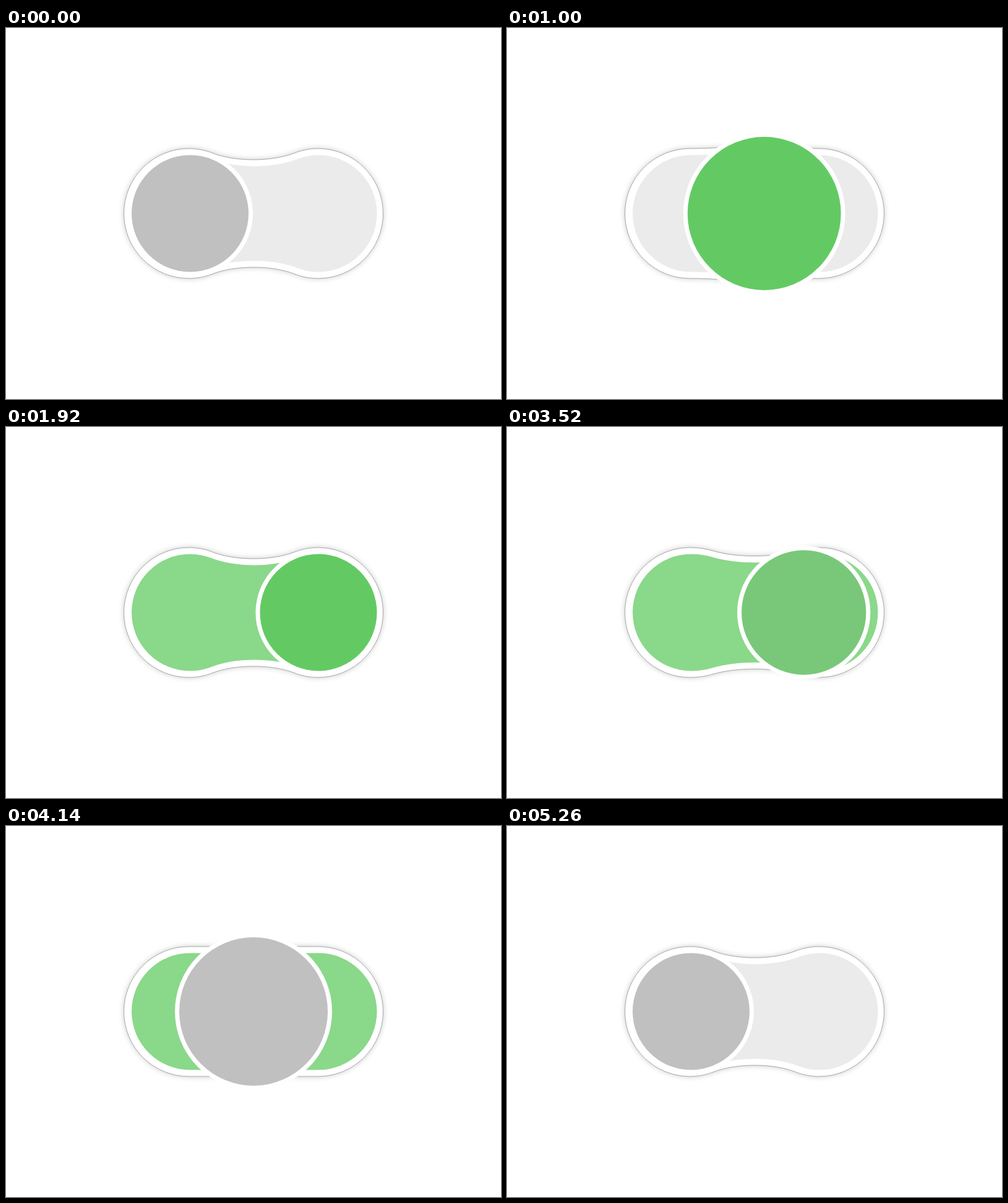
These frames come from a looping animation (800x600 px, 5580 ms). An HTML page:

```html
<!DOCTYPE html>
<html lang="en">
<head>
<meta charset="utf-8">
<title>Elastic toggle</title>
<style>
  html, body { margin: 0; width: 100%; height: 100%; overflow: hidden; background: #fff; }
  svg { display: block; width: 800px; height: 600px; }
  #body { fill: #fff; stroke: #a6a6a6; stroke-width: 1; filter: drop-shadow(0 0 4px rgba(0, 0, 0, .2)); }
  #knob { stroke: #fff; stroke-width: 14; paint-order: stroke; }
</style>
</head>
<body>
<svg viewBox="0 0 800 600">
  <path id="body"/>
  <path id="track"/>
  <circle id="knob" cy="300"/>
</svg>
<script>
  const LOOP = 5580, SPRING = 600;
  const LEFT = 297.5, MIDDLE = 400, RIGHT = 505;
  const GRAY = [192, 192, 192], GREEN = [99, 202, 99];
  const TRACK_OFF = [235, 235, 235], TRACK_ON = [138, 216, 138];
  const body = document.getElementById('body');
  const track = document.getElementById('track');
  const knob = document.getElementById('knob');

  function elastic(ms, period) {
    const t = ms / SPRING;
    if (t <= 0) return 0;
    if (t >= 1) return 1;
    return 1 - 2 ** (-10 * t) * Math.cos(2 * Math.PI * t / period);
  }

  function mix(from, to, p) {
    const k = Math.min(1, Math.max(0, p));
    return `rgb(${from.map((v, i) => Math.round(v + (to[i] - v) * k))})`;
  }

  // Two round lobes joined by a waist; swell 0 is pinched, 1 is straight.
  function peanut(x1, x2, r, swell) {
    const angle = Math.asin(.3667);
    const cos = Math.cos(angle), sin = Math.sin(angle);
    const dx = r * sin, drop = r * (1 - cos);
    const handle = r * 4 / 3 * Math.tan(angle / 4);
    const dip = (18 - drop / 4) / .75;
    const reach = (dip - drop) * cos / sin;
    const top = [
      [0, 0], [handle, 0], [dx - handle * cos, drop - handle * sin],
      [dx, drop], [dx + reach, dip]
    ];
    const half = top.map(([x, y]) => [x, -r + y * (1 - swell)]);
    const upper = half.map(([x, y]) => [x1 + x, 300 + y])
      .concat(half.map(([x, y]) => [x2 - x, 300 + y]).reverse());
    const lower = upper.map(([x, y]) => [x, 600 - y]).reverse();
    const edge = pts => pts.slice(1).join(' ');
    return `M${upper[0]}C${edge(upper)}A${r} ${r} 0 0 1 ${lower[0]}C${edge(lower)}A${r} ${r} 0 0 1 ${upper[0]}Z`;
  }

  function draw(t) {
    const on = t < 3500;
    const press = elastic(t - (on ? 854 : 3502), .6);
    const release = elastic(t - (on ? 1358 : 4225), .8);
    const [start, end] = on ? [LEFT, RIGHT] : [RIGHT, LEFT];
    const swell = press - release;

    body.setAttribute('d', peanut(295.5, 504.5, 105, swell));
    track.setAttribute('d', peanut(297.5, 505, 94.5, swell));
    track.setAttribute('fill', mix(TRACK_OFF, TRACK_ON, on ? release : 1 - release));
    knob.setAttribute('cx', start + (MIDDLE - start) * press + (end - MIDDLE) * release);
    knob.setAttribute('r', 94.5 + 25.5 * swell);
    knob.setAttribute('fill', mix(GRAY, GREEN, on ? press : 1 - press));
  }

  const begin = performance.now();
  function tick() {
    draw((performance.now() - begin) % LOOP);
    requestAnimationFrame(tick);
  }
  tick();
</script>
</body>
</html>
```
